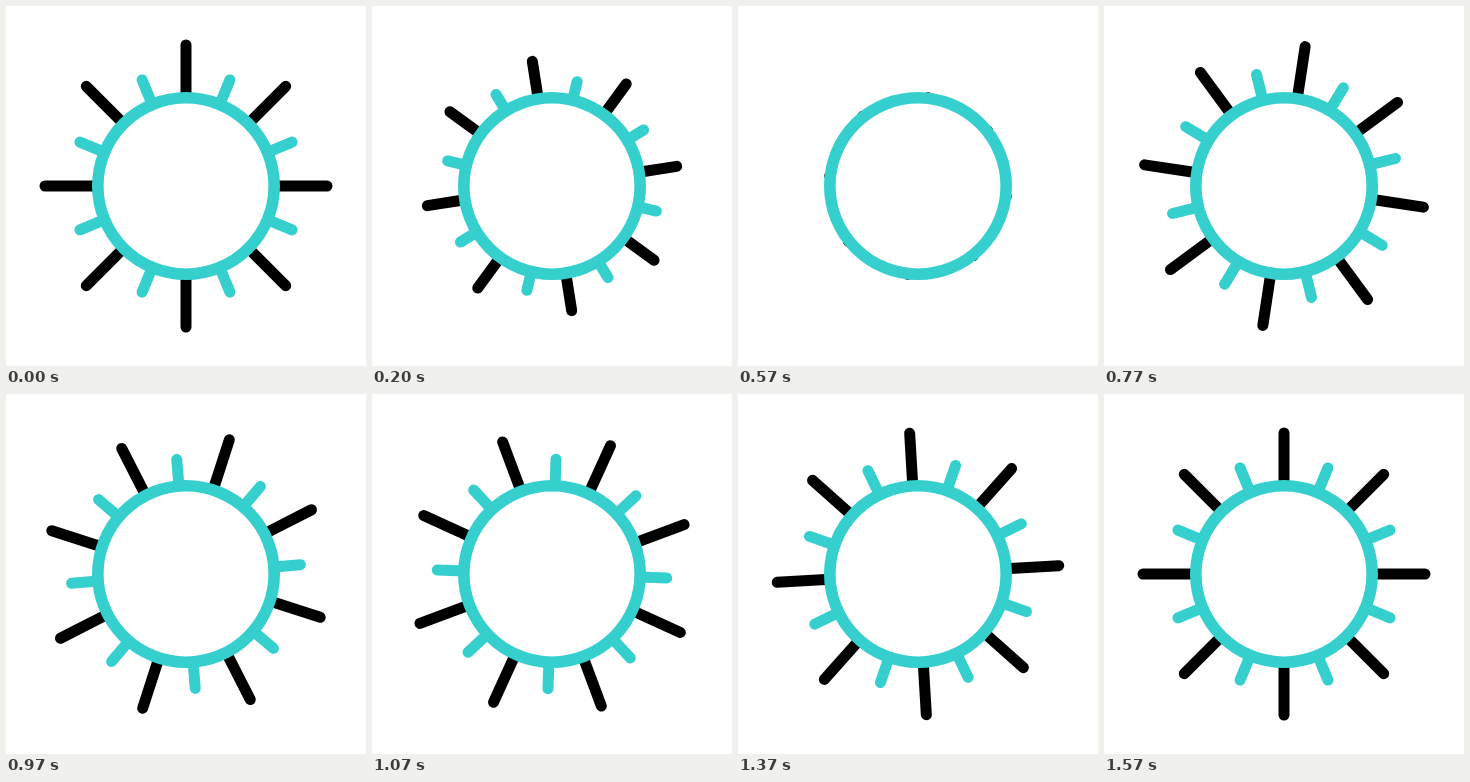
These frames come from a looping animation (360x360 px, 1.67 s). An HTML page:

```html
<!DOCTYPE html>
<html lang="en">
<head>
<meta charset="utf-8">
<title>Sun</title>
<style>
  html, body { margin: 0; width: 100%; height: 100%; overflow: hidden; background: #fff; }
  svg { display: block; width: 100vw; height: 100vh; }
  line { stroke-width: 11; stroke-linecap: round; }
</style>
</head>
<body>
<svg viewBox="0 0 360 360">
  <g transform="translate(180 180)">
    <g id="rays"></g>
    <circle r="88.2" fill="#fff" stroke="#35cfce" stroke-width="11.6"/>
  </g>
</svg>
<script>
const LOOP = 1670, FPS = 30, LAST = 47;
const RING = 88;
const TURN = -38.7;
const BACK = 18;      // step at which the wind-up ends
const HIDDEN = 16.4;  // step at which the rays are fully drawn in
const GROWN = 23;     // step at which they are out again

const group = document.getElementById('rays');

function addRays(offset, tip, color) {
  return Array.from({ length: 8 }, (_, i) => {
    const el = document.createElementNS('http://www.w3.org/2000/svg', 'line');
    el.setAttribute('y1', -RING);
    el.setAttribute('stroke', color);
    el.setAttribute('transform', `rotate(${offset + i * 45})`);
    group.append(el);
    return { el, tip };
  });
}

const rays = [...addRays(0, 141, '#000'), ...addRays(22.5, 114.8, '#35cfce')];

// cubic-bezier(.42, 0, .58, 1)
function ease(x) {
  if (x <= 0) return 0;
  if (x >= 1) return 1;
  let lo = 0, hi = 1;
  for (let i = 0; i < 24; i++) {
    const s = (lo + hi) / 2, r = 1 - s;
    if (1.26 * s * r * r + 1.74 * s * s * r + s * s * s < x) lo = s;
    else hi = s;
  }
  return lo * lo * (3 - 2 * lo);
}

// 0 -> 1 by peak, then 1 -> 0 by end
const thereAndBack = (k, peak, end) =>
  k < peak ? ease(k / peak) : 1 - ease((k - peak) / (end - peak));

function draw(t) {
  const k = Math.min(LAST, Math.floor((t + 4) * FPS / 1000));
  const out = 1 - thereAndBack(k, HIDDEN, GROWN);
  group.setAttribute('transform', `rotate(${TURN * thereAndBack(k, BACK, LAST)})`);
  for (const { el, tip } of rays) el.setAttribute('y2', -(RING + (tip - RING) * out));
}

const start = performance.now();
function tick() {
  draw((performance.now() - start) % LOOP);
  requestAnimationFrame(tick);
}
tick();
</script>
</body>
</html>
```
